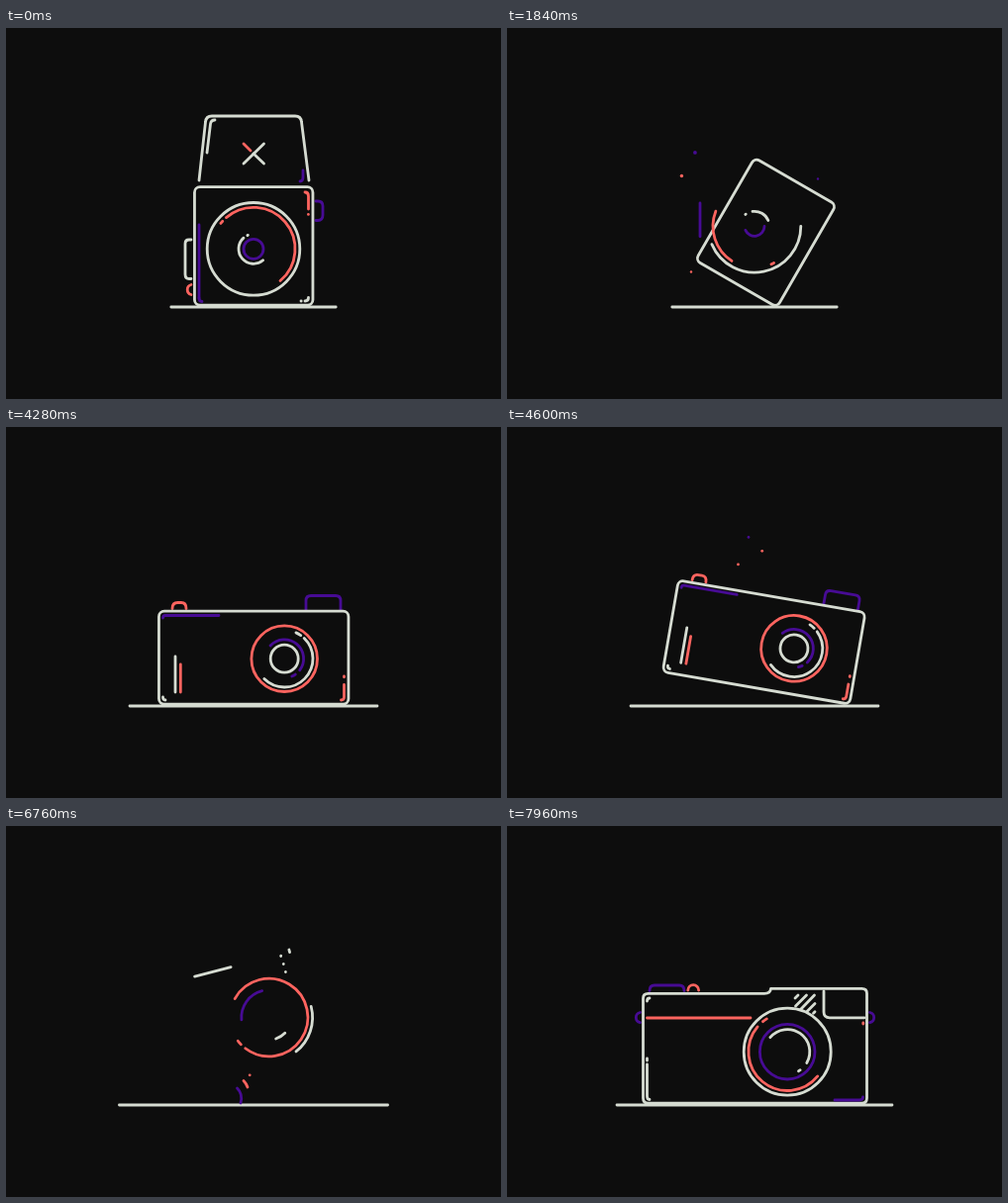
Recreate the animation shown at these times as an HTML page. Size 500 by 375 pixels, loop 8000 ms.

```html
<!DOCTYPE html>
<html lang="en">
<head>
<meta charset="utf-8">
<title>Line cameras</title>
<style>
  html, body { margin: 0; width: 100%; height: 100%; overflow: hidden; background: #0d0d0d; }
  svg { display: block; width: 100%; height: 100%; }
</style>
</head>
<body>
<svg id="stage" viewBox="0 0 500 375" fill="none" stroke-width="2.8" stroke-linecap="round" stroke-linejoin="round"></svg>
<script>
const LOOP = 8000;
const NEVER = 1e6;
const W = '#d6dcd2', R = '#fd645f', P = '#470b94';
const stage = document.getElementById('stage');

// Easing and keyframes
const lin = p => p;
const easeIn = p => p * p;
const easeOut = p => 1 - (1 - p) ** 3;
const inOut = p => p < .5 ? 2 * p * p : 1 - 2 * (1 - p) ** 2;
const prog = (t, a, b) => Math.min(1, Math.max(0, (t - a) / (b - a)));

// Each key is [time, value, easing into this key]
function key(t, ...keys) {
  let [t0, v0] = keys[0];
  for (const [t1, v1, ease = inOut] of keys) {
    if (t <= t1) return t1 === t0 ? v1 : v0 + (v1 - v0) * ease(prog(t, t0, t1));
    t0 = t1;
    v0 = v1;
  }
  return v0;
}

// Drawing helpers
const num = n => +n.toFixed(3);
const dash = (a, b) => a <= 0 && b >= 1 ? '' :
  ` pathLength="1" stroke-dasharray="${num(b - a)} 2" stroke-dashoffset="${num(-a)}"`;

function line(color, d, a = 0, b = 1) {
  return b - a < .002 ? '' : `<path d="${d}" stroke="${color}"${dash(a, b)}/>`;
}

function part(t, color, d, tIn, tOut, dur = 320) {
  const a = inOut(prog(t, tOut, tOut + dur));
  const b = inOut(prog(t, tIn, tIn + dur));
  return line(color, d, a, b);
}

function arc(color, x, y, r, a0, a1) {
  const span = a1 - a0;
  if (span < .5) return '';
  if (span >= 359.9) return `<circle cx="${num(x)}" cy="${num(y)}" r="${num(r)}" stroke="${color}"/>`;
  const at = a => {
    const q = a * Math.PI / 180;
    return num(x + r * Math.cos(q)) + ' ' + num(y + r * Math.sin(q));
  };
  return line(color, `M${at(a0)}A${num(r)} ${num(r)} 0 ${span > 180 ? 1 : 0} 1 ${at(a1)}`);
}

const dot = (color, x, y, r) =>
  r > .05 ? `<circle cx="${num(x)}" cy="${num(y)}" r="${num(r)}" fill="${color}"/>` : '';

const turn = (angle, x, y, body) =>
  `<g transform="rotate(${num(angle)} ${x} ${y})">${body}</g>`;

// A speck that leaves (x0,y0) at t0, is at (x1,y1) with radius r at tk, gone at t1
function speck(t, [t0, tk, t1], color, x0, y0, x1, y1, r) {
  if (t <= t0 || t >= t1) return '';
  const k = easeOut(prog(t, t0, t1)) / easeOut(prog(tk, t0, t1));
  return dot(color, x0 + (x1 - x0) * k, y0 + (y1 - y0) * k, r * Math.min(1.4, (t1 - t) / (t1 - tk)));
}

function floor(t) {
  const half = t < 5800
    ? key(t, [1840, 83.2], [2320, 125], [4640, 125], [5350, 0])
    : key(t, [6180, 0], [7000, 139, easeOut]);
  return half > .5 ? line(W, `M${num(250 - half)} 282H${num(250 + half)}`) : '';
}

// Box camera fittings, unwound one after another
function boxParts(t) {
  const off = (color, d, tOut, dur = 400) => part(t, color, d, -999, tOut, dur);
  const top = key(t, [1400, 199], [1840, 177, lin], [2040, 168, lin]);
  const end = key(t, [1120, 273], [1840, 211], [2040, 168, lin]);
  const dotEnd = prog(t, 900, 1000);
  return off(W, 'M195 154L201.500 95Q202 89 208 89H292Q298 89 298.500 95L306 154', 1180, 460) +
    off(W, 'M203 126L206.500 97Q207 93 211 93', 980) +
    off(W, 'M240 137L260.500 117', 1100) + off(W, 'M260.500 137L250 127', 1040) +
    off(R, 'M240 117L247 124', 1000) +
    off(P, 'M300 144V151Q300 155 297 155', 880) +
    off(R, 'M302 166Q305.500 166 305.500 170V183', 900) +
    dot(R, 305.4, key(t, [0, 188.4], [280, 189]), 1.4 * (1 - dotEnd)) +
    off(P, 'M313 175H315Q320 175 320 180V189Q320 194.500 315 194.500H313', 1060) +
    off(W, 'M187 214H185Q181 214 181 218V249Q181 253.500 185 253.500H187', 1140) +
    off(R, 'M187 259.500A5.200 5.200 0 0 0 187 269.500', 1180) +
    off(W, 'M302 276Q305.500 276 305.500 272.500', 860, 260) +
    off(W, 'M298 276H298.200', 860, 200) +
    off(P, 'M195 273Q195 276.500 198 276.500', 1000, 120) +
    (end - top > 1 ? line(P, `M195 ${num(top)}V${num(end)}`) : '');
}

// The body tips over on its corner and stretches into the wide camera
function rollingBody(t) {
  const angle = key(t, [1640, 0], [1840, 30, easeIn], [2240, 90]);
  const w = key(t, [1640, 119.5], [1840, 95, easeOut], [2200, 94]);
  const h = key(t, [1840, 119.5], [2280, 191.5]);
  const q = angle * Math.PI / 180, r = 5.5;
  const reach = (w / 2 - r) * Math.sin(q) + (h / 2 - r) * Math.cos(q) + r;
  const x = 250.2 + 13 * Math.sin(2 * q), y = 280.2 - reach;
  const gone = inOut(prog(t, 4660, 5060));
  if (gone >= .998) return '';
  return `<g transform="translate(${num(x)} ${num(y)}) rotate(${num(angle)})">` +
    `<rect x="${num(-w / 2)}" y="${num(-h / 2)}" width="${num(w)}" height="${num(h)}" rx="${r}" stroke="${W}"${dash(gone, 1)}/></g>`;
}

function firstLens(t) {
  const x = key(t, [1840, 250], [2360, 281.2]);
  const y = key(t, [1640, 223.3], [1840, 200.3, easeOut], [2360, 234.2]);
  const shut = inOut(prog(t, 4620, 5020));
  const ring = (color, r, a0, a1) =>
    arc(color, x, y, r, a0 + 200 * shut, a0 + 200 * shut + (a1 - a0) * (1 - shut));
  const size = (a, b) => key(t, [1840, a], [2360, b]);
  const white = size(46.8, 28.8), red = size(42, 33.3), violet = size(10, 19.4), hub = size(15, 14);
  const redDash = key(t, [840, -142], [1840, 62, easeIn], [2100, 130, lin]);
  const hubDot = key(t, [840, 246], [1840, 592, easeIn], [2000, 640, lin]);
  const mark = key(t, [2440, -190], [2720, -119], [3240, -66, easeOut]);
  const tail = 12 * prog(t, 2860, 3160);
  return ring(W, white,
      key(t, [1380, -203], [1840, 0, lin], [2720, -21], [3280, -46]),
      key(t, [1380, 157], [1840, 157], [2720, 162], [3280, 135])) +
    ring(R, red,
      key(t, [840, -131], [1840, 123, easeIn], [2720, 181, easeOut]),
      key(t, [840, 50], [1840, 200, easeIn], [2720, 538, easeOut], [2800, 542, lin])) +
    ring(R, red, redDash, redDash + 4 * (1 - prog(t, 1840, 2100))) +
    ring(P, violet,
      key(t, [1380, -205], [1840, 0, lin], [2720, 229, easeOut], [3280, 223]),
      key(t, [1380, 155], [1840, 155], [2720, 430, easeOut], [3280, 397])) +
    ring(P, violet, 427 - tail, 427) +
    ring(W, hub,
      key(t, [840, 50], [1840, 262, easeIn], [2600, 340, easeOut]),
      key(t, [840, 228], [1840, 336, easeIn], [2600, 700, easeOut])) +
    ring(W, hub, hubDot, hubDot + 2 * (1 - prog(t, 1840, 2000))) +
    ring(W, white, mark, mark + 11 * prog(t, 2440, 2640));
}

function wideParts(t) {
  const on = (color, d, tIn, tOut, dur) => part(t, color, d, tIn, tOut, dur);
  const shine = key(t, [2520, 0], [2720, .43, lin], [3120, 1, easeOut]);
  const edge = key(t, [2560, 0], [2720, .35, lin], [3120, 1, easeOut]);
  const out = t0 => inOut(prog(t, t0, t0 + 300));
  return on(P, 'M303 185V175.500Q303 170.500 308 170.500H333Q338 170.500 338 175.500V185', 2260, 4700) +
    on(R, 'M168 183.500Q168 177.500 173.500 177.500H177Q182 177.500 182 183.500', 2300, 4640) +
    on(W, 'M171 268V232', 2320, 4620) + on(R, 'M176.300 268V240', 2380, 4660) +
    line(P, 'M158.500 193Q158.500 190.500 161 190.500H215', out(4640), shine) +
    on(W, 'M158.500 273Q158.500 276 161 276', 2400, 4700, 240) +
    line(R, 'M338.500 276Q341.500 276 341.500 273V260.500', out(4620), edge) +
    on(R, 'M341.500 252.800V252', 2960, 4620, 120);
}

function flashRays(t) {
  const p = prog(t, 2560, 2880);
  if (p <= 0 || p >= 1) return '';
  const far = 12 + 14 * easeOut(p) * .8, len = 1.5 * Math.sin(p * Math.PI);
  return [-45, 0, 45].map(a => turn(a, 320, 178,
    line(R, `M320 ${num(178 - far + len)}V${num(178 - far - len)}`))).join('');
}

function specks(t) {
  const pop = [1660, 1840, 2060], land = [2240, 2720, 3160], toss = [4380, 4600, 4680], drop = [7020, 7300, 7760];
  return speck(t, pop, P, 215, 160, 190, 126, 1.9) +
    speck(t, pop, R, 205, 172, 176.5, 149.5, 1.7) +
    speck(t, pop, R, 190, 264, 186, 246.5, 1.2) +
    speck(t, pop, P, 300, 172, 314, 152.5, 1.2) +
    speck(t, land, R, 158, 278, 132.5, 259.5, 1.4) +
    speck(t, land, P, 158, 278, 113, 270, .7) +
    speck(t, land, R, 342, 276, 374, 243.5, 1.4) +
    speck(t, land, W, 342, 276, 391, 262, .8) +
    speck(t, land, P, 342, 276, 376.5, 272.5, 1.4) +
    speck(t, toss, P, 247, 168, 244, 111.5, 1.4) +
    speck(t, toss, R, 252, 168, 257.7, 125.3, 1.4) +
    speck(t, toss, R, 240, 168, 233.5, 139, 1.4) +
    speck(t, drop, R, 362, 276, 410, 240, 1.4) +
    speck(t, drop, P, 362, 276, 432, 258, 1.4) +
    speck(t, drop, W, 362, 276, 402, 268, 1);
}

function compactLens(t) {
  const x = 283.2, y = 228.2;
  const k = (...keys) => key(t, ...keys);
  const redDash = k([6480, 60], [6760, 150, lin], [7440, 231, easeOut]);
  return arc(W, x, y, 44,
      k([6560, -30], [6760, 0, lin], [7320, 30]),
      k([6560, -30], [6760, 66, lin], [7320, 390])) +
    arc(R, x, y, 39.3,
      k([6360, -170], [6760, -137.5, lin], [7440, 39, easeOut]),
      k([6360, -170], [6760, 141.5], [7440, 220, easeOut])) +
    arc(R, x, y, 39.3, redDash, redDash + 7 * prog(t, 6600, 6720)) +
    arc(P, x, y, 27.8,
      k([6560, 170], [6760, 189.5, lin], [7320, 220]),
      k([6560, 170], [6760, 270, lin], [7320, 580])) +
    arc(W, x, y, 22.6,
      k([6660, 40], [6760, 58, lin], [7440, 220, easeOut]),
      k([6660, 40], [6760, 85, lin], [7440, 390, easeOut])) +
    arc(W, x, y, 22.6, 55, 55 + 5 * prog(t, 7300, 7480));
}

function compactParts(t) {
  const on = (color, d, tIn, dur) => part(t, color, d, tIn, NEVER, dur);
  const outline = 'M221 169.300H260Q266 169.300 266.500 164.300H358.500Q363.500 164.300 363.500 169.300' +
    'V275Q363.500 280.200 358.500 280.200H142.500Q137.500 280.200 137.500 275V174.300Q137.500 169.300 142.500 169.300Z';
  const grown = key(t, [6640, 0], [6760, .056, lin], [7240, 1]);
  const stripes = ['M294 171L291 174', 'M302.500 171L291.500 182', 'M310.500 171L296.500 185.500',
    'M311 179.500L302.500 188', 'M311 187.800L309.500 189.300'];
  return line(W, outline, 0, grown) +
    on(W, 'M320 167V188Q320 193.800 326 193.800H361', 6700, 420) +
    stripes.map((d, i) => on(W, d, i < 2 ? 6860 : 6735, 380)).join('') +
    on(R, 'M246 194H141.500', 6960, 400) +
    on(P, 'M144 166.500Q144 161 149 161H174Q179 161 179 166.500', 7060) +
    on(R, 'M182.800 166A5.400 5.400 0 0 1 193.600 166', 7160) +
    on(P, 'M134.500 188.500A5.200 5.200 0 0 0 134.500 198.700', 7160) +
    on(P, 'M366.500 188.500A5.200 5.200 0 0 1 366.500 198.700', 7200) +
    on(W, 'M141.500 177Q141.500 174 144 174', 7280) +
    on(W, 'M144 276.500Q141.500 276.500 141.500 273V241', 7240, 400) +
    on(W, 'M141.500 237V235', 7520, 120) +
    on(R, 'M359.800 199V200', 7480, 120) +
    on(P, 'M359.500 274Q359.500 277 356 277H331', 7400, 560);
}

function jumpTrail(t) {
  return part(t, P, 'M237 280Q239.500 271 233.500 265', 6500, 6760, 240) +
    part(t, R, 'M244 264Q242.500 260 240 257.500', 6520, 6760, 220) +
    dot(R, 246.2, 251.8, 1.4 * prog(t, 6640, 6720) * (1 - prog(t, 6800, 6900)));
}

function scene(t) {
  let out = floor(t) + specks(t);
  if (t < 5100) {
    const tilt = key(t, [4280, 0], [4600, 9.8], [4760, 11.5, easeOut]);
    out += turn(tilt, 346, 280,
      (t < 2200 ? boxParts(t) : wideParts(t) + flashRays(t)) + rollingBody(t) + firstLens(t));
  } else if (t > 6300) {
    const tilt = key(t, [6360, -18], [6760, -14.5, easeOut], [7000, 0, easeIn], [7080, -1.5, easeOut], [7160, 0, easeIn]);
    out += jumpTrail(t) + turn(tilt, 138, 280, compactParts(t) + compactLens(t));
  }
  return out;
}

const start = performance.now();
function tick() {
  stage.innerHTML = scene((performance.now() - start) % LOOP);
  requestAnimationFrame(tick);
}
tick();
</script>
</body>
</html>
```
